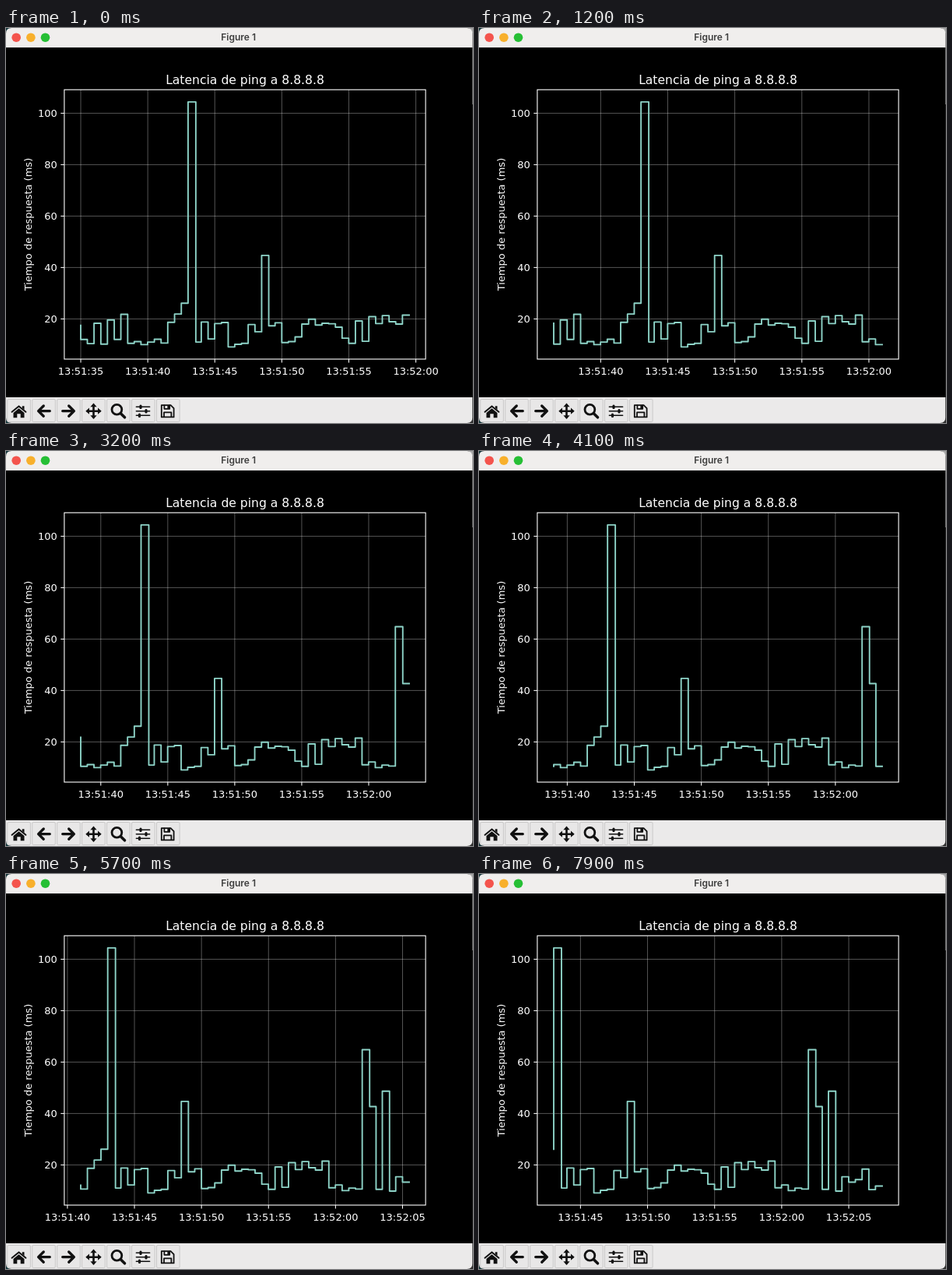
An HTML page that plays this animation: 600 by 507 pixels, repeating every 8 s.

```html
<!DOCTYPE html>
<html lang="es">
<head>
<meta charset="utf-8">
<title>Figure 1</title>
<style>
  html, body { margin: 0; width: 100%; height: 100%; overflow: hidden; background: #000; }
  svg { display: block; width: 600px; height: 507px; }
  .plot text { font: 13px "DejaVu Sans", sans-serif; fill: #fff; }
  .plot .title { font-size: 15.6px; }
  .mid { text-anchor: middle; }
  .end { text-anchor: end; }
  .grid { stroke: #fff; stroke-opacity: .33; stroke-width: 1; }
  .tick { stroke: #fff; stroke-width: 1.05; }
  .bar { font: 600 12px Inter, "Open Sans", sans-serif; fill: #3d3d3d; }
  .btn { fill: #e8e7e7; stroke: #c9c8c8; }
  .icon { fill: none; stroke: #111; stroke-linejoin: round; stroke-linecap: round; }
  .solid { fill: #111; stroke: none; }
</style>
</head>
<body>
<svg viewBox="0 0 600 507">
  <rect width="600" height="507" fill="#16383d"/>
  <rect x="590" width="10" height="98" fill="#a5a5a5"/>
  <rect x="590" y="98" width="10" height="409" fill="#303030"/>
  <rect width="599.3" height="507" rx="7" fill="#000"/>
  <path d="M0 25V7Q0 0 7 0H592.3Q599.3 0 599.3 7V25Z" fill="#f0eeed"/>
  <circle cx="13.2" cy="12.2" r="5.8" fill="#f4544d"/>
  <circle cx="31.9" cy="12.2" r="5.8" fill="#f8b02c"/>
  <circle cx="50.5" cy="12.2" r="5.8" fill="#26bf35"/>
  <text class="bar mid" x="298.7" y="16.2">Figure 1</text>

  <g class="plot">
    <g id="rows"></g>
    <g id="cols"></g>
    <path id="line" fill="none" stroke="#8dd3c7" stroke-width="1.9" stroke-linejoin="round" stroke-linecap="square"/>
    <rect x="74.9" y="79.2" width="464.2" height="345.8" fill="none" stroke="#fff" stroke-width="1.1"/>
    <text class="title mid" x="307" y="71.6">Latencia de ping a 8.8.8.8</text>
    <text class="mid" transform="translate(32.8 252) rotate(-90)">Tiempo de respuesta (ms)</text>
  </g>

  <path d="M0 474H599.3V500Q599.3 507 592.3 507H7Q0 507 0 500Z" fill="#ebeaea"/>
  <g id="buttons"></g>
  <g class="icon">
    <path class="solid" d="M16.5 488.2 23.5 494V500.3H18.7V495.3H14.3V500.3H9.5V494Z"/>
    <path d="M7.6 492.8 16.5 485.4 25.4 492.8" stroke-width="2"/>
    <path class="solid" d="M20.8 485.3H23.5V490L20.8 487.8Z"/>
    <path d="M48.3 485 41.6 491.6 48.3 498.2M42 491.6H56.3" stroke-width="3.3"/>
    <path d="M80.7 485 87.4 491.6 80.7 498.2M87 491.6H72.7" stroke-width="3.3"/>
    <path d="M112.5 484V499.5M104.7 491.7H120.3" stroke-width="2.6"/>
    <path class="solid" d="M112.5 481.5 116.6 486.2H108.4ZM112.5 501.9 108.4 497.2H116.6ZM102.3 491.7 107 487.6V495.8ZM122.7 491.7 118 495.8V487.6Z"/>
    <circle cx="142.4" cy="489.8" r="6.4" stroke-width="2.8"/>
    <path d="M147.6 495 152.5 499.8" stroke-width="3.6"/>
    <path d="M167.4 486.3H184.6M167.4 491.8H184.6M167.4 497.3H184.6" stroke-width="1.6"/>
    <path d="M173 485.2V487.4M180 490.7V492.9M171.5 496.2V498.4" stroke-width="3.2"/>
    <path d="M199.8 484.2H211.6L215.6 488.2V499.4H199.8Z" stroke-width="1.8"/>
    <path d="M203.4 484.5V488.8H210.2V484.5M203 499V493.4H212.4V499" stroke-width="1.8"/>
    <path class="solid" d="M207.4 484.5H210V488.8H207.4Z"/>
  </g>
</svg>
<script>
const LOOP = 8000, SHOWN = 50, PERIOD = 0.5;
const LEFT = 74.9, RIGHT = 539.1, TOP = 79.2, BOTTOM = 425;
const PAD = (RIGHT - LEFT) / 22;
const START = 34.98; // seconds after 13:51:00

// ping times in ms, one every half second
const pings = [
  17.5, 12, 10.4, 18.3, 10.2, 19.6, 12, 21.8, 10.5, 11.2,
  10, 11, 12.1, 10.6, 18.7, 21.9, 26.1, 104.4, 11, 18.8,
  12.2, 18.2, 18.6, 9.1, 10.1, 10.5, 17.8, 15, 44.7, 17.3,
  18.5, 10.8, 11.2, 13, 18, 19.9, 17.6, 18.3, 18.1, 16.8,
  12.5, 10.5, 19.2, 11.3, 20.9, 18.2, 21.3, 18.9, 18, 21.5,
  11.1, 12.2, 10, 11, 10.6, 64.8, 42.7, 10.5, 48.7, 9.8,
  15.4, 13.3, 14.3, 18.4, 10.4, 11.8
];

const $ = id => document.getElementById(id);
const yOf = v => 439.4 - 3.3 * v;
const stamp = i => START + i * PERIOD + pings[i] / 1000; // reply arrives after the ping
const two = n => String(n).padStart(2, "0");
const clock = s => `13:${51 + Math.floor(s / 60)}:${two(s % 60)}`;
const seg = (cls, x1, y1, x2, y2) =>
  `<line class="${cls}" x1="${x1}" y1="${y1}" x2="${x2}" y2="${y2}"/>`;

$("rows").innerHTML = [20, 40, 60, 80, 100].map(v => {
  const y = yOf(v);
  return seg("grid", LEFT, y, RIGHT, y) + seg("tick", LEFT - 4.6, y, LEFT, y) +
    `<text class="end" x="65.8" y="${y + 4.9}">${v}</text>`;
}).join("");

$("buttons").innerHTML = Array.from({ length: 7 }, (_, i) =>
  `<rect class="btn" x="${1.8 + i * 31.95}" y="476.5" width="29.6" height="29" rx="1.5"/>`).join("");

function draw(first) {
  const last = first + SHOWN - 1;
  const t0 = stamp(first);
  const scale = (RIGHT - LEFT - 2 * PAD) / (stamp(last) - t0);
  const xOf = t => LEFT + PAD + (t - t0) * scale;

  let path = `M${xOf(t0)} ${yOf(pings[first])}`;
  for (let i = first + 1; i <= last; i++) path += `V${yOf(pings[i])}H${xOf(stamp(i))}`;
  $("line").setAttribute("d", path);

  let cols = "";
  for (let s = 35; s <= 70; s += 5) {
    const x = xOf(s);
    if (x < LEFT || x > RIGHT) continue;
    cols += seg("grid", x, TOP, x, BOTTOM) + seg("tick", x, BOTTOM, x, BOTTOM + 4.6) +
      `<text class="mid" x="${x}" y="444.5">${clock(s)}</text>`;
  }
  $("cols").innerHTML = cols;
}

let shown = -1;
function tick() {
  const t = performance.now() % LOOP;
  const first = Math.floor((t + 300) / 500); // a new reply at 200 ms, then every 500 ms
  if (first !== shown) draw(shown = first);
  requestAnimationFrame(tick);
}
tick();
</script>
</body>
</html>
```
